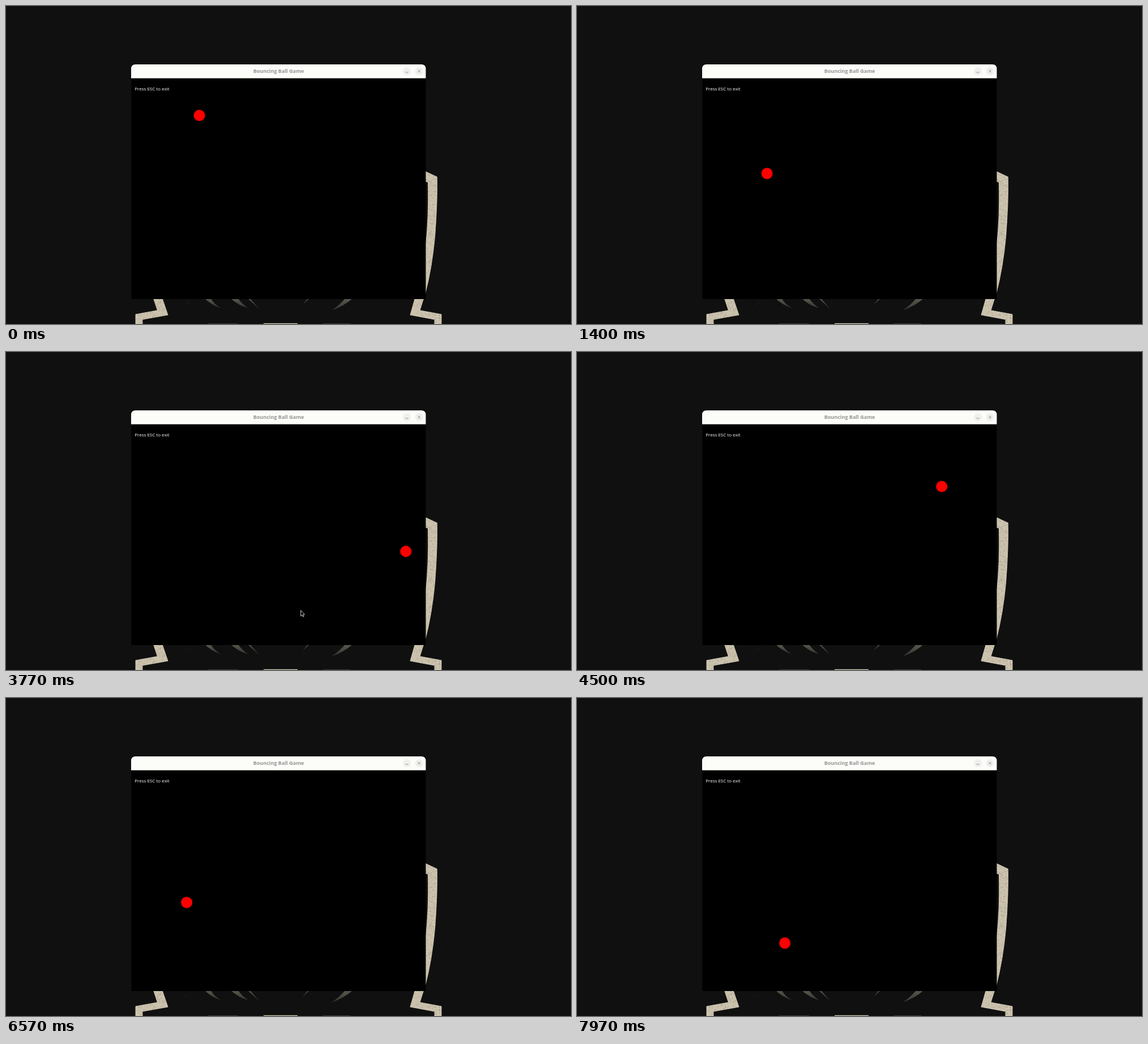
An HTML page that plays this animation: 998x561 px, repeating every 8000 ms.

```html
<!DOCTYPE html>
<html lang="en">
<head>
<meta charset="utf-8">
<title>Bouncing Ball Game</title>
<style>
  html, body { margin: 0; width: 100%; height: 100%; overflow: hidden; background: #101010; }
  svg { display: block; width: 100vw; height: 100vh; }
  text { font-family: "Open Sans", "Noto Sans", sans-serif; }
  .ribbon { fill: #cac1ad; stroke: #e2d9c2; stroke-width: .8; }
  .icon { fill: none; stroke: #8c8c8c; stroke-width: 1; }
</style>
</head>
<body>
<svg viewBox="0 0 998 561">
  <defs>
    <path id="side" d="M735 289 L741 292 L761.3 301.5 Q762.3 345 757.5 408 Q752.5 461 741 506 L735 506 L741 425 Q747 375 745.5 311 L735 307 Z"/>
    <path id="foot" d="M739.5 510 L731 537 L769 544 V565 H757 V553 L714 545 L724 510 Z"/>
    <path id="footLeft" d="M258.5 510 L267.5 537 L229 544 V565 H241 V553 L286 545 L274 510 Z"/>
    <clipPath id="ribbons">
      <use href="#side"/><use href="#foot"/><use href="#footLeft"/>
    </clipPath>
    <linearGradient id="fade" x1="0" x2="0" y1="0" y2="1">
      <stop stop-color="#5c5a50"/><stop offset="1" stop-color="#34332e"/>
    </linearGradient>
  </defs>

  <rect width="998" height="561" fill="#101010"/>
  <g class="ribbon">
    <use href="#side"/><use href="#foot"/><use href="#footLeft"/>
  </g>
  <g clip-path="url(#ribbons)" fill="none" stroke-width=".8">
    <path id="darkSpecks" stroke="#82796a"/>
    <path id="lightSpecks" stroke="#ded4c0"/>
  </g>
  <g fill="url(#fade)">
    <path d="M350 515 L361 515 Q368 527 380 533 Q363 528 350 515Z"/>
    <path d="M396 515 L409 515 Q418 527 428 533 Q411 529 396 515Z"/>
    <path d="M426 515 L430 515 L448 535Z"/>
    <path d="M534 515 L537 515 L523 528Z"/>
    <path d="M600 515 L613 515 Q598 529 575 537 Q589 528 600 515Z"/>
  </g>
  <path d="M326 522 L313 528" stroke="#1c1b18"/>
  <path d="M357 561 H410 M560 561 H608" stroke="#6b675b"/>
  <path d="M455 560.5 H515" stroke="#d8d0b9" stroke-width="1.5"/>

  <rect x="221.4" y="126" width="520.1" height="391" fill="#000"/>
  <path d="M221 127.6 V111 Q221 103 229 103 H733.5 Q741.5 103 741.5 111 V127.6Z" fill="#fcfcf9"/>
  <text x="481.5" y="118" font-size="9" font-weight="700" text-anchor="middle" fill="#949494">Bouncing Ball Game</text>
  <g fill="#efefed"><circle cx="708" cy="115" r="7"/><circle cx="729.6" cy="115" r="7"/></g>
  <path class="icon" d="M705.5 117 h5 M727.4 112.8 l4.4 4.4 m0 -4.4 l-4.4 4.4"/>
  <text x="227.3" y="148.7" font-size="8" font-weight="500" fill="#fff">Press ESC to exit</text>

  <circle id="ball" r="10" fill="#f00"/>
  <path id="pointer" d="M520.7 455.8 V466 L523 463.9 L524.7 467.2 L526.2 466.4 L524.6 463.2 H527.5Z" fill="#000" stroke="#ddd" stroke-width=".9"/>
</svg>
<script>
  const LOOP = 8000, STEP = 100 / 3;
  const field = { left: 230.75, right: 732.5, top: 136.4, bottom: 508.9 };
  const start = { x: 341.5, y: 193 };
  // Distance covered along each axis: [ms, px]
  const pace = [[0, 0], [1400, 215.6], [2533, 392.4], [3767, 586.3],
                [5233, 815.2], [6567, 1025.9], [8000, 1256]];
  const byId = id => document.getElementById(id);
  const ball = byId("ball"), pointer = byId("pointer");

  function distance(t) {
    const i = pace.findIndex(([end]) => t < end);
    const [t0, d0] = pace[i - 1], [t1, d1] = pace[i];
    return d0 + (d1 - d0) * (t - t0) / (t1 - t0);
  }

  // Travels toward the low wall first, then reflects between both walls
  function bounce(from, low, high, travelled) {
    const span = high - low, period = 2 * span;
    const offset = ((from - low - travelled) % period + period) % period;
    return low + (offset > span ? period - offset : offset);
  }

  function speckle(id, count, seed) {
    const random = () => (seed = (seed * 16807) % 2147483647) / 2147483647;
    const dots = (n, x, y, w, h) => Array.from({ length: n }, () =>
      `M${(x + random() * w).toFixed(1)} ${(y + random() * h).toFixed(1)}h.9`).join("");
    byId(id).setAttribute("d", dots(count, 741, 292, 22, 214) +
      dots(count / 2, 228, 517, 60, 44) + dots(count / 2, 712, 517, 60, 44));
  }

  function draw(now) {
    const t = Math.floor((now % LOOP + 4) / STEP) * STEP % LOOP;
    const d = distance(t);
    ball.setAttribute("cx", bounce(start.x, field.left, field.right, d));
    ball.setAttribute("cy", bounce(start.y, field.top, field.bottom, d));
    pointer.style.visibility = t > 3400 && t < 4300 ? "visible" : "hidden";
  }

  speckle("darkSpecks", 360, 71);
  speckle("lightSpecks", 300, 913);
  const origin = performance.now();
  function tick() {
    draw(performance.now() - origin);
    requestAnimationFrame(tick);
  }
  tick();
</script>
</body>
</html>
```
